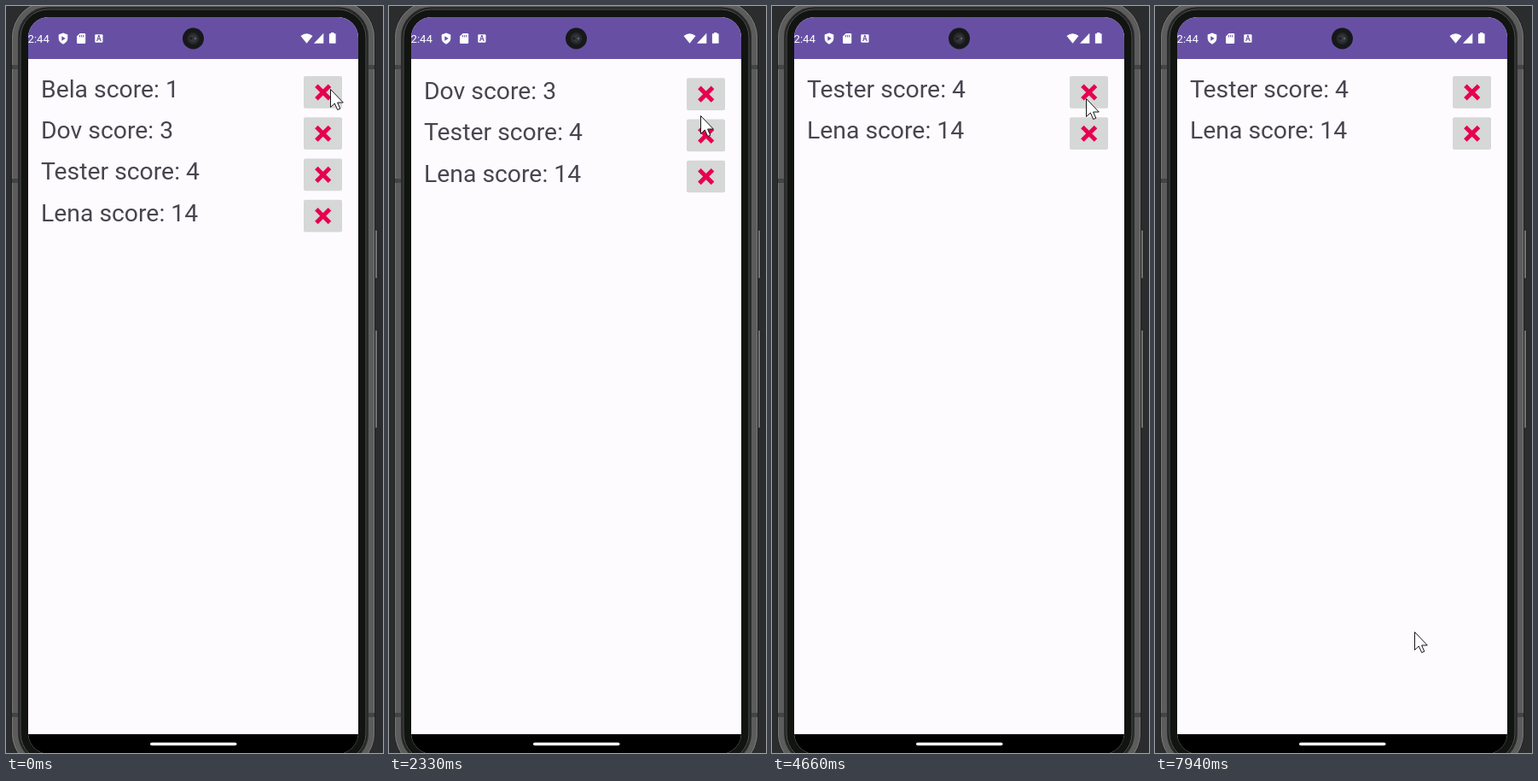
An HTML page that plays this animation: 442x874 px, repeating every 8 s.

```html
<!DOCTYPE html>
<html lang="en">
<head>
<meta charset="utf-8">
<title>Score list</title>
<style>
  html, body { margin: 0; width: 100%; height: 100%; overflow: hidden; background: #2b2c2d; }
  svg { display: block; width: 442px; height: 874px; font-family: Roboto, "Open Sans", sans-serif; }
  .row text { font-size: 28.35px; fill: #49454f; }
  .action { font-size: 13.2px; font-weight: 500; letter-spacing: .089em; fill: #6750a4; }
</style>
</head>
<body>
<svg viewBox="0 0 442 874">
  <defs>
    <filter id="soft" x="-20%" y="-40%" width="140%" height="200%">
      <feGaussianBlur stdDeviation="9"/>
    </filter>
    <clipPath id="screen"><rect x="26" y="13" width="387" height="862" rx="24"/></clipPath>
  </defs>

  <!-- phone body -->
  <rect width="442" height="874" fill="#2b2c2d"/>
  <g fill="#737373" stroke="#1c1c1c" stroke-width=".8">
    <rect x="431" y="262" width="4.5" height="57" rx="1.5"/>
    <rect x="431" y="379" width="4.5" height="115" rx="1.5"/>
  </g>
  <rect x="6.5" y="-6" width="426" height="900" rx="43" fill="#5c5c5c" stroke="#202121"/>
  <rect x="7.500" y="-5" width="424" height="898" rx="42" fill="none" stroke="#777"/>
  <path d="M7 69h7v5H7zM7 202h7v5H7zM7 827h7v5H7zM425 69h7v5h-7zM425 827h7v5h-7z" fill="#434444"/>
  <rect x="15" y="2" width="409" height="883.500" rx="34.500" fill="#121412" stroke="#2a2b2b" stroke-width="2"/>
  <rect x="17" y="4" width="405" height="879.500" rx="32.500" fill="#121412" stroke="#555656"/>

  <!-- screen -->
  <g clip-path="url(#screen)">
    <rect x="26" y="13" width="387" height="862" fill="#fefbff"/>
    <rect x="26" y="13" width="387" height="49" fill="#6750a4"/>
    <rect x="26" y="852" width="387" height="23" fill="#000"/>
  </g>
  <rect x="169" y="861.700" width="101.500" height="3.600" rx="1.800" fill="#fff"/>
  <g transform="translate(219.500 38)">
    <circle r="12.500" fill="#17181a"/>
    <circle r="7" fill="#26282b"/>
    <circle r="4.500" fill="#34363b"/>
    <circle cx="-2.500" r="1.300" fill="#15171b"/>
    <circle cx="2.500" r="1.300" fill="#5a6070"/>
  </g>

  <!-- status icons -->
  <g fill="#fff">
    <text x="25.500" y="43" font-size="13.2">2:44</text>
    <path d="M67 31.500l5.300 2v4.300q0 4.600-5.300 6.900q-5.300-2.300-5.300-6.900v-4.300z"/>
    <path d="M65.300 35.300v5.400l4.400-2.700z" fill="#6750a4"/>
    <path d="M86.600 32h5.400q1.200 0 1.200 1.200v9.600q0 1.200-1.200 1.200h-7.800q-1.200 0-1.200-1.200v-7.200z"/>
    <path d="M86.500 34v2.500M88.500 34v2.500M90.500 34v2.500" stroke="#6750a4" stroke-width=".9"/>
    <rect x="104.300" y="33.300" width="9.200" height="9.400" rx="1"/>
    <text x="108.900" y="41" font-size="8.500" font-weight="700" text-anchor="middle" fill="#6750a4">A</text>
    <path d="M345.500 35q7-5.600 14 0l-7 8.800zM361 43.800l11.300-12v12z"/>
    <path d="M381 32.300v-1.300h3.400v1.300h1.600q.6 0 .6.600v10.300q0 .6-.6.600h-6.500q-.6 0-.6-.6v-10.300q0-.6.600-.6z"/>
  </g>

  <g id="rows"></g>

  <g id="dialog">
    <rect x="34" y="410" width="371" height="128" rx="24" fill="#503c50" opacity=".025"/>
    <rect x="50" y="415" width="339" height="101" rx="4" fill="#2a202c" opacity=".24" filter="url(#soft)"/>
    <rect x="51" y="407.300" width="337" height="99.500" rx="2" fill="#fffeff"/>
    <circle id="ripple" r="16" fill="#6750a4" opacity=".09"/>
    <text x="73.600" y="441.300" font-size="15.05" fill="#1c1b1f">Are you sure you want to delete the score?</text>
    <text class="action" x="276.300" y="485.200">NO</text>
    <text class="action" x="333.700" y="485.200">YES</text>
  </g>

  <g id="cursor">
    <path d="M.5.500V21.500L5.300 17L8.700 24.500L11.800 23.200L8.600 16H15.300Z" fill="#fff" stroke="#151515"/>
  </g>
</svg>

<script>
const LOOP = 8000, STEP = 120, ROW_PITCH = 48.2;
const FADE = 120, SLIDE = 250, DISMISS = 150;

// Each scene presses the top delete button, opens the dialog and answers it.
const scenes = [
  { press: 420, open: 940, close: 1940, fade: .88, tap: [350, 481] },
  { press: 2880, open: 3000, close: 4150, fade: .88, tap: [353, 474] },
  { press: 5090, open: 5330, close: 6730, fade: .67 }
];

// Pointer moves: leave, arrive, x, y
const start = [380, 97];
const moves = [
  [540, 1020, 350, 480],
  [1820, 1940, 358, 439],
  [1970, 2570, 365, 107],
  [2880, 3120, 373, 392],
  [3120, 3840, 353, 472],
  [4180, 4300, 343, 320],
  [4300, 4660, 368, 108],
  [5090, 5330, 368, 374],
  [5330, 5930, 346, 484],
  [6210, 6450, 280, 482],
  [6610, 6730, 321, 527],
  [6730, 6850, 355, 628],
  [7430, 7670, 208, 665],
  [7700, 7940, 304, 732]
];

const scores = [["Bela", 1], ["Dov", 3], ["Tester", 4], ["Lena", 14]];

const byId = id => document.getElementById(id);
const clamp = v => Math.min(1, Math.max(0, v));
const easeOut = p => 1 - (1 - p) ** 3;
const easeInOut = p => (1 - Math.cos(Math.PI * p)) / 2;
const stepped = age => Math.floor(age / STEP) * STEP; // the screen refreshes in coarse steps
const place = (node, x, y) => node.setAttribute("transform", `translate(${x} ${y})`);

byId("rows").innerHTML = scores.map(([name, score]) => `
  <g class="row">
    <text x="41" y="107">${name} score: ${score}</text>
    <rect x="349" y="82.100" width="45" height="37.700" rx="2"/>
    <path d="M363.900 93.200l15.600 15.600m0-15.600l-15.600 15.600" stroke="#e6004f" stroke-width="5"/>
  </g>`).join("");
const rows = [...document.querySelectorAll(".row")];
const buttons = rows.map(row => row.querySelector("rect"));

function drawRows(t) {
  // A row starts to fade just before the dialog is gone.
  const ages = scenes.filter(scene => scene.tap)
    .map(({ close }) => stepped(t - close - DISMISS) + FADE * .8);
  const top = ages.filter(age => age >= FADE).length;
  const shift = ages.reduce((sum, age) => sum + easeInOut(clamp((age - FADE) / SLIDE)), 0);
  const pressed = scenes.some(({ press, open }) => t >= press && t < open + 2 * STEP);
  rows.forEach((row, i) => {
    row.setAttribute("opacity", i < ages.length ? 1 - clamp(ages[i] / FADE) : 1);
    place(row, 0, i < top ? 0 : (i - shift) * ROW_PITCH);
    buttons[i].setAttribute("fill", pressed && i === top ? "#c0c0c0" : "#d6d7d7");
  });
}

function drawDialog(t) {
  const scene = scenes.find(({ open, close }) => t >= open && t < close + DISMISS);
  const entering = scene && t < scene.open + STEP;
  const leaving = scene && t >= scene.close;
  const opacity = !scene ? 0 : entering ? .83 : leaving ? scene.fade : 1;
  byId("dialog").setAttribute("opacity", opacity);
  place(byId("dialog"), 0, (entering ? 14 : -10) * (1 - opacity));

  const tap = leaving && scene.tap;
  byId("ripple").setAttribute("visibility", tap ? "visible" : "hidden");
  if (tap) place(byId("ripple"), ...tap);
}

function drawPointer(t) {
  let [x, y] = start;
  for (const [leave, arrive, toX, toY] of moves) {
    if (t < leave) break;
    const p = easeOut(clamp(stepped(t - leave) / (arrive - leave)));
    x += (toX - x) * p;
    y += (toY - y) * p;
  }
  place(byId("cursor"), Math.round(x), Math.round(y));
}

function draw(t) {
  drawRows(t);
  drawDialog(t);
  drawPointer(t);
}

const began = performance.now();
function frame(now) {
  draw(Math.max(0, now - began) % LOOP);
  requestAnimationFrame(frame);
}
draw(0);
requestAnimationFrame(frame);
</script>
</body>
</html>
```
